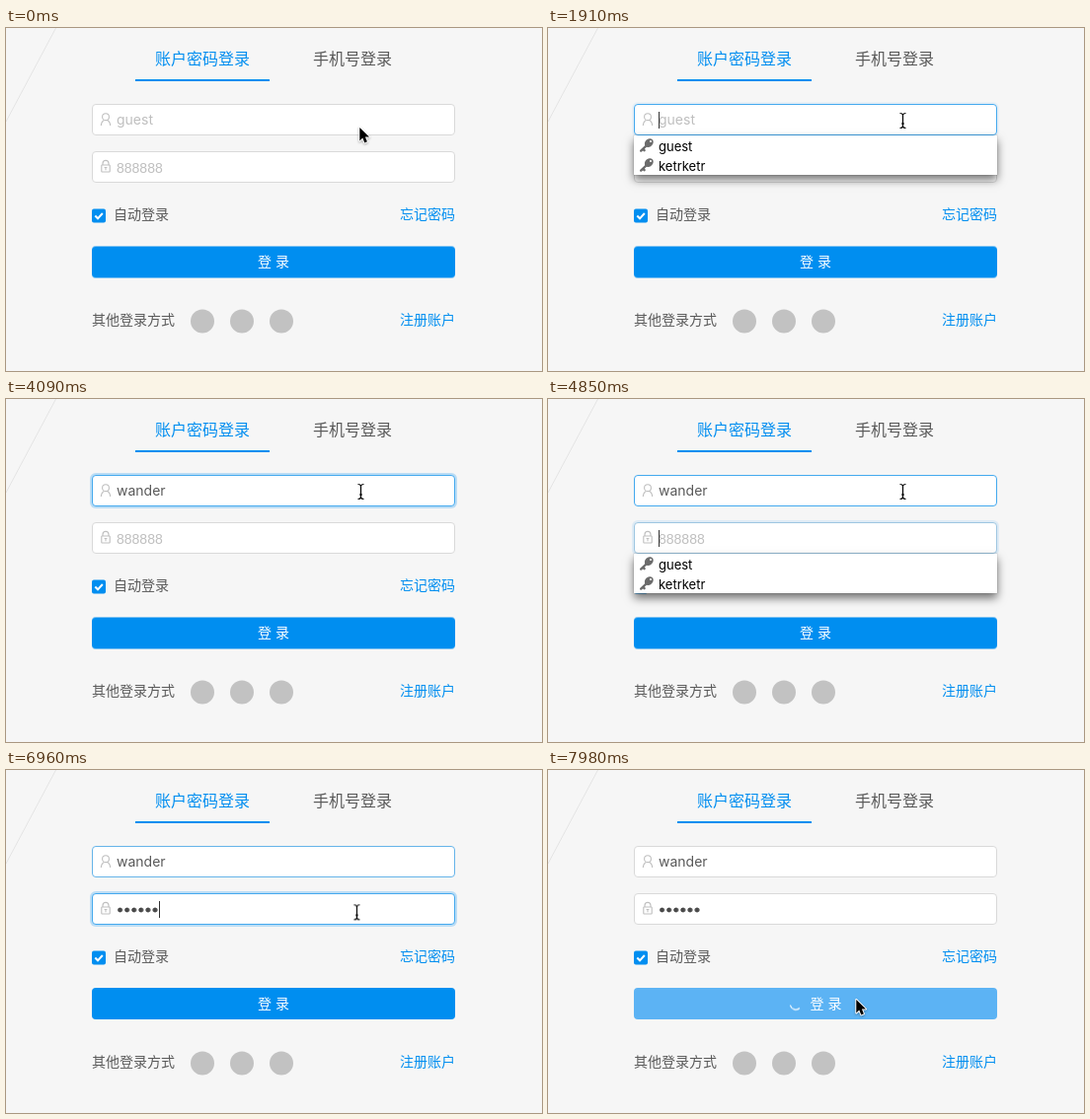
These frames come from a looping animation (543x348 px, 8 s). An HTML page:

```html
<!DOCTYPE html>
<html lang="zh-CN">
<head>
<meta charset="utf-8">
<title>登录</title>
<style>
:root { --blue: #008ef0; --edge: #d9d9d9; --hover: #44a9ee; --glow: rgba(0, 142, 240, .24); --none: rgba(0, 142, 240, 0); }
html, body { margin: 0; width: 100%; height: 100%; overflow: hidden; background: #f6f6f6; }
body { position: relative; font: 14px Inter, sans-serif; color: #595959; }
body * { animation: 8s infinite linear; }
body > *, .field > * { position: absolute; }
svg { display: block; overflow: visible; }
text { font: 14px "Noto Sans CJK SC", "Noto Sans CJK", sans-serif; fill: #595959; }
text.tab { font-size: 16px; }
text.link { fill: var(--blue); }
.base { left: 0; top: 0; }

/* fields */
.field { left: 87px; width: 366px; height: 30px; border: 1px solid var(--edge); border-radius: 4px; background: #fff; box-shadow: 0 0 0 2px var(--none); line-height: 30px; }
.field svg { left: 7px; top: 7px; fill: none; stroke: #bfbfbf; stroke-width: 1.1; }
.hint, .value { left: 24px; top: 0; height: 30px; white-space: pre; }
.hint { color: #bfbfbf; }
.value { display: flex; align-items: center; }
i { font-style: normal; }
.value b { width: 1px; height: 17px; background: #333; }
.name { top: 77px; animation-name: nameField; animation-timing-function: ease-out; }
.name .hint { animation: nameHint 8s infinite step-end; }
.name i::before { content: ""; animation: typeName 8s infinite step-end; }
.name b { animation: nameCaret 8s infinite step-end; }
.pass { top: 125px; animation-name: passField; animation-timing-function: ease-out; }
.pass .hint { top: 1px; font-family: "Liberation Sans", Arial, sans-serif; animation: passHint 8s infinite step-end; }
.pass i { height: 8px; margin-top: 2px; background: radial-gradient(circle, #4a4a4a 2.1px, transparent 2.8px) 0 0 / 7.1px 8px; animation: typePass 8s infinite step-end; }
.pass b { animation: passCaret 8s infinite step-end; }

@keyframes nameField {
  0%, 14.75% { border-color: var(--edge); }
  18%, 86.475% { border-color: var(--hover); }
  90.2%, 100% { border-color: var(--edge); }
  0%, 23.5% { box-shadow: 0 0 0 2px var(--none); }
  26%, 58.125% { box-shadow: 0 0 0 2px var(--glow); }
  60.6%, 100% { box-shadow: 0 0 0 2px var(--none); }
}
@keyframes passField {
  0%, 59.7%, 99.6%, 100% { border-color: var(--edge); box-shadow: 0 0 0 2px var(--none); }
  63.25%, 96.5% { border-color: var(--hover); box-shadow: 0 0 0 2px var(--glow); }
}
@keyframes nameHint { 0% { opacity: 1; } 28.5%, 100% { opacity: 0; } }
@keyframes passHint { 0% { opacity: 1; } 68.375%, 100% { opacity: 0; } }
@keyframes typeName {
  0% { content: ""; }
  28.5% { content: "w"; }
  30.625% { content: "wa"; }
  33.25% { content: "wan"; }
  36.625% { content: "wand"; }
  43.25% { content: "wande"; }
  44.75%, 100% { content: "wander"; }
}
@keyframes typePass {
  0% { width: 0; }
  68.375% { width: 7.1px; }
  70.625% { width: 14.2px; }
  73.25% { width: 21.3px; }
  77.75% { width: 28.4px; }
  80% { width: 35.5px; }
  83.625%, 100% { width: 42.6px; }
}
@keyframes nameCaret { 0%, 37%, 51.125%, 100% { opacity: 0; } 23.5%, 43.25% { opacity: 1; } }
@keyframes passCaret { 0%, 66.625%, 89.875%, 100% { opacity: 0; } 60.4%, 68.375% { opacity: 1; } }

/* button */
.btn { animation-name: settle; }
.btn rect { fill: var(--blue); stroke: var(--none); paint-order: stroke; animation-name: press; }
.btn text { fill: #fff; text-anchor: middle; word-spacing: .9px; font-weight: 500; }
.label { animation-name: label; }
.spin { fill: none; stroke: #fff; stroke-width: 1.2; stroke-linecap: round; opacity: 0; animation-name: spinIn; }
.spin path { animation-name: spin; }
@keyframes settle {
  0%, 68.4% { transform: translate(87px, 221.5px); }
  68.5%, 100% { transform: translate(87px, 221px); }
}
@keyframes press {
  0%, 90.6% { fill: var(--blue); }
  94.1%, 97% { fill: #44a9f2; }
  99%, 100% { fill: #5cb3f4; }
  0%, 97.4% { stroke: rgba(0, 142, 240, .4); stroke-width: 0; }
  99.6%, 100% { stroke: var(--none); stroke-width: 6px; }
}
@keyframes label { 0%, 97% { transform: none; } 99.5%, 100% { transform: translateX(10.5px); } }
@keyframes spinIn { 0%, 97% { opacity: 0; } 99%, 100% { opacity: 1; } }
@keyframes spin { 0%, 97% { transform: rotate(-79deg); } 100% { transform: rotate(7deg); } }

/* suggestions */
.drop { left: 87px; width: 368px; height: 40px; background: #fff; opacity: 0; box-shadow: 0 5px 9px rgba(0, 0, 0, .55), 0 0 1px rgba(0, 0, 0, .4); font-size: 13px; line-height: 20px; color: #000; }
.drop div { display: flex; height: 20px; padding-left: 5px; }
.drop svg { margin: 2px 4px 0 0; }
.drop span { padding-top: 1px; }
.first { top: 109px; animation-name: dropFirst; }
.second { top: 157px; animation-name: dropSecond; }
@keyframes dropFirst { 0%, 23.4% { opacity: 0; } 23.5%, 28.5% { opacity: 1; } 30%, 100% { opacity: 0; } }
@keyframes dropSecond { 0%, 60.4% { opacity: 0; } 60.5%, 68.375% { opacity: 1; } 68.75%, 100% { opacity: 0; } }

/* pointer */
.pointer { left: 0; top: 0; animation-name: move; }
.pointer g { stroke-linejoin: round; }
.pointer .arrow { animation: arrow 8s infinite step-end; }
.pointer .beam { animation: beam 8s infinite step-end; fill: none; }
.pointer .hand { animation: hand 8s infinite step-end; }
.arrow, .hand { filter: drop-shadow(0 1px 1px rgba(0, 0, 0, .3)); }
@keyframes move {
  0%, .375% { transform: translate(359px, 101px); }
  1.75%, 5.125% { transform: translate(359px, 98px); }
  6.5%, 86.25% { transform: translate(359px, 94px); }
  87% { transform: translate(355px, 144px); }
  88.25% { transform: translate(346px, 176px); }
  90% { transform: translate(330px, 215px); }
  91.5% { transform: translate(318px, 231px); }
  93.125%, 96.5% { transform: translate(313px, 234px); }
  97%, 100% { transform: translate(313px, 233px); }
}
@keyframes arrow { 0%, 86.475%, 87.5%, 97%, 100% { opacity: 1; } 14.75%, 86.7%, 90.6% { opacity: 0; } }
@keyframes beam { 0%, 86.475%, 87.5%, 100% { opacity: 0; } 14.75%, 86.7% { opacity: 1; } }
@keyframes hand { 0%, 97%, 100% { opacity: 0; } 90.6% { opacity: 1; } }
</style>
</head>
<body>
<svg class="base" width="543" height="348">
  <defs>
    <g id="key">
      <path d="M8 8 2.2 13.6M4.2 11.8 5.6 13.2" stroke="#6b6b6b" stroke-width="2.4" stroke-linecap="round"/>
      <ellipse cx="10.3" cy="5.6" rx="4.9" ry="3.9" transform="rotate(-45 10.3 5.6)" fill="#6b6b6b"/>
      <circle cx="12" cy="4" r="1.1" fill="#fff"/>
    </g>
    <path id="bar" d="M-2.5-7.5Q0-7.5.5-6 1-7.5 3.5-7.5M.5-6V6M-2.5 7.5Q0 7.5.5 6 1 7.5 3.5 7.5M-1 3H2"/>
  </defs>
  <path d="M50.5 0 0 95" stroke="#e4e4e4"/>
  <text class="tab link" x="151" y="36.5">账户密码登录</text>
  <text class="tab" x="311" y="36.5">手机号登录</text>
  <rect x="131" y="52" width="136" height="2" fill="#008ef0"/>
  <rect x="87" y="183.5" width="14" height="14" rx="2" fill="#008ef0"/>
  <path d="M90.3 190.5 93 193.3 97.8 188" fill="none" stroke="#fff" stroke-width="2"/>
  <text x="109" y="194.3">自动登录</text>
  <text class="link" x="399" y="194.3">忘记密码</text>
  <text x="87" y="300.5">其他登录方式</text>
  <g fill="#c2c2c2">
    <circle cx="199" cy="297.5" r="12"/>
    <circle cx="239" cy="297.5" r="12"/>
    <circle cx="279" cy="297.5" r="12"/>
  </g>
  <text class="link" x="399" y="300.5">注册账户</text>
  <g class="btn">
    <rect width="368" height="32" rx="4"/>
    <g class="spin" transform="translate(164 16.5)"><path d="M-5.4 1.6A5.6 5.6 0 0 0 3.6 4.3"/></g>
    <g class="label"><text x="184" y="20.5">登 录</text></g>
  </g>
</svg>

<div class="field name">
  <svg width="14" height="16"><circle cx="6" cy="5.2" r="3.4"/><path d="M1.3 14Q1.6 9.8 4.4 8.4M10.7 14Q10.4 9.8 7.6 8.4"/></svg>
  <span class="hint">guest</span>
  <span class="value"><i></i><b></b></span>
</div>
<div class="field pass">
  <svg width="14" height="16"><rect x="1.8" y="6" width="8.4" height="7" rx=".6"/><path d="M3 6V4.4A3 3 0 0 1 9 4.4V6M6 8.5V11.2M4.6 8.5H7.4"/></svg>
  <span class="hint">888888</span>
  <span class="value"><i></i><b></b></span>
</div>

<div class="drop first">
  <div><svg width="16" height="16"><use href="#key"/></svg><span>guest</span></div>
  <div><svg width="16" height="16"><use href="#key"/></svg><span>ketrketr</span></div>
</div>
<div class="drop second">
  <div><svg width="16" height="16"><use href="#key"/></svg><span>guest</span></div>
  <div><svg width="16" height="16"><use href="#key"/></svg><span>ketrketr</span></div>
</div>

<svg class="pointer" width="1" height="1">
  <g class="arrow">
    <path d="M-.7 0V13.4L2.3 10.6 4.3 15.4 6.9 14.3 4.9 9.6H9Z" stroke="#fff" stroke-width="2" paint-order="stroke"/>
  </g>
  <g class="beam">
    <use href="#bar" stroke="#fff" stroke-width="2.6"/>
    <use href="#bar" stroke="#000" stroke-width="1.2"/>
  </g>
  <g class="hand">
    <path d="M-1.3 1.4Q-1.3 0 0 0 1.3 0 1.5 1.4L2.2 5.2Q3.8 4.2 4.6 5.6 6.2 4.8 7 6.2 9 5.4 9.4 7.8 10 10.7 8.4 13.2V15.5H1.4Q.6 13.8-1.5 11.8-4.6 8.8-4 7.8-2.8 6.6-.2 9Z" fill="#fff" stroke="#000"/>
    <path d="M2.7 10.2V13M4.8 10.2V13M6.8 10.2V13" stroke="#000" stroke-width=".8"/>
  </g>
</svg>
</body>
</html>
```
